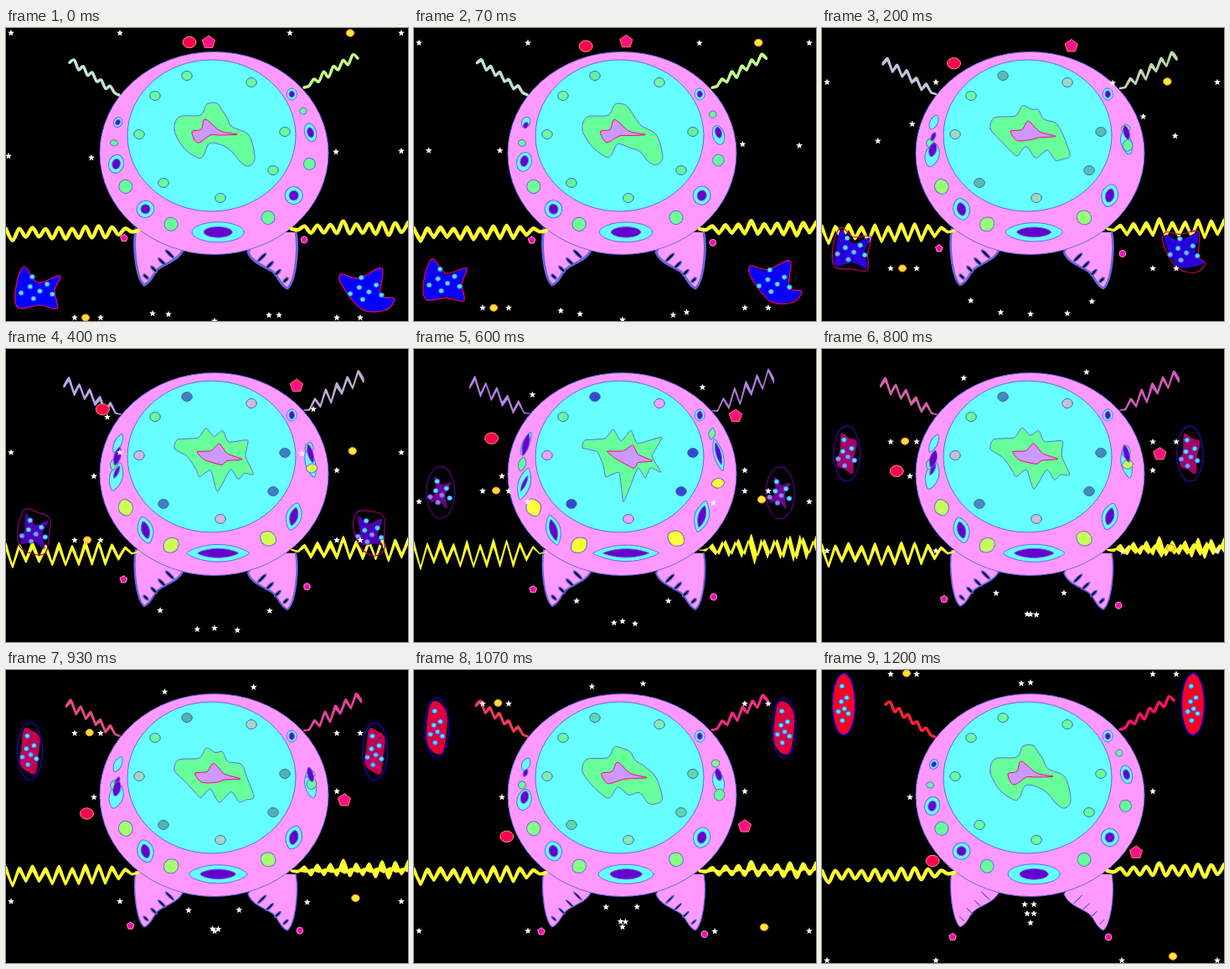
An HTML page with a canvas that plays this animation: 480 by 350 pixels, repeating every 1.27 s.

```html
<!DOCTYPE html>
<html>
<head>
<meta charset="utf-8">
<style>
html, body { margin: 0; width: 100%; height: 100%; overflow: hidden; background: #000; }
canvas { display: block; }
</style>
</head>
<body>
<canvas id="stage" width="480" height="350"></canvas>
<script>
const ctx = document.getElementById('stage').getContext('2d');
const LOOP = 1270, STEP = 200 / 3, TICK = 40, LAST = 29, TAU = Math.PI * 2;
const EDGE = '#6666e0', GREEN = '#66ff99', CYAN = '#66ffff', PINK = '#ff99ff', YELLOW = '#ffff33';

// p runs 0..1 over the loop, m rises to 1 halfway and falls back
let p = 0, m = 0;

const lerp = (a, b, t) => a + (b - a) * t;
const mixPoint = (a, b, t) => [lerp(a[0], b[0], t), lerp(a[1], b[1], t)];
const keyed = (a, b, c, mix) => mix(p < .5 ? a : c, b, m);
const times = (n, make) => Array.from({ length: n }, (_, i) => make(i));
const random = (i, seed) => {
  const v = Math.sin(i * 127.1 + seed * 311.7) * 43758.5;
  return v - Math.floor(v);
};

function mixColor(a, b, t) {
  const part = (c, i) => parseInt(c.slice(i, i + 2), 16);
  return `rgb(${[1, 3, 5].map(i => Math.round(lerp(part(a, i), part(b, i), t)))})`;
}

// Polynomial through points spread evenly over t = 0..1
function along(points, t) {
  const last = points.length - 1, u = t * last;
  let x = 0, y = 0;
  points.forEach(([px, py], i) => {
    let w = 1;
    for (let j = 0; j <= last; j++) if (j !== i) w *= (u - j) / (i - j);
    x += w * px;
    y += w * py;
  });
  return [x, y];
}

function paint(fill, stroke, width = 1, rule = 'nonzero') {
  if (fill) { ctx.fillStyle = fill; ctx.fill(rule); }
  if (stroke) { ctx.strokeStyle = stroke; ctx.lineWidth = width; ctx.stroke(); }
}

function ellipse(x, y, rx, ry, fill, stroke, width, turn = 0) {
  ctx.beginPath();
  ctx.ellipse(x, y, rx, ry, turn, 0, TAU);
  paint(fill, stroke, width);
}

// Curve through the points; k = 0 gives straight sides
function curve(points, k, closed = true) {
  const n = points.length;
  const at = i => closed ? points[(i + n) % n] : points[Math.max(0, Math.min(n - 1, i))];
  ctx.moveTo(...points[0]);
  for (let i = 0; i < (closed ? n : n - 1); i++) {
    const [a, b, c, d] = [at(i - 1), at(i), at(i + 1), at(i + 2)], s = k / 6;
    ctx.bezierCurveTo(b[0] + (c[0] - a[0]) * s, b[1] + (c[1] - a[1]) * s,
      c[0] - (d[0] - b[0]) * s, c[1] - (d[1] - b[1]) * s, ...c);
  }
}

function polygon(x, y, r, sides, fill, stroke, inner = 1) {
  const n = inner < 1 ? sides * 2 : sides;
  ctx.beginPath();
  for (let i = 0; i < n; i++) {
    const a = i / n * TAU - TAU / 4, d = i % 2 && inner < 1 ? r * inner : r;
    ctx.lineTo(x + d * Math.cos(a), y + d * Math.sin(a));
  }
  ctx.closePath();
  paint(fill, stroke);
}

// Ellipse with pointed ends when point nears 1
function leaf([x, y], rx, ry, lean, point, fill) {
  const h = .55 * rx * (1 - point), v = .55 * ry;
  ctx.save();
  ctx.translate(x, y);
  ctx.rotate(lean * TAU / 360);
  ctx.beginPath();
  ctx.moveTo(0, -ry);
  ctx.bezierCurveTo(h, -ry, rx, -v, rx, 0);
  ctx.bezierCurveTo(rx, v, h, ry, 0, ry);
  ctx.bezierCurveTo(-h, ry, -rx, v, -rx, 0);
  ctx.bezierCurveTo(-rx, -v, -h, -ry, 0, -ry);
  paint(fill, EDGE);
  ctx.restore();
}

// A squiggle leaving the body that can split into a zigzag band
function wave(calmLine, spikyLine, count, calmSize, spikeSize, seed) {
  return times(count, i => {
    const t = i / (count - 1), fade = Math.min(1, t * 4), side = i % 2 ? 1 : -1;
    const size = side * fade * (.5 + .5 * random(i, seed));
    const [x, y] = mixPoint(...calmLine, t), [sx, sy] = mixPoint(...spikyLine, t);
    const swing = size * spikeSize, gap = fade * spikeSize * (.12 + .2 * random(i, seed + 9));
    return {
      calm: [x, y + size * calmSize],
      top: [sx, sy + swing - gap],
      bottom: [sx, sy + swing + gap],
      crossed: [sx + 4, sy - swing * 1.2]
    };
  });
}

const leftLine = [[158, 242], [0, 246]], rightLine = [[341, 240], [480, 239]];
const leftWave = wave(leftLine, leftLine, 21, 8, 16, 2);
const rightWave = wave(rightLine, rightLine, 19, 9, 16, 5);
const leftFeeler = wave([[135, 80], [76, 38]], [[138, 77], [66, 39]], 12, 5, 11, 3);
const rightFeeler = wave([[356, 71], [420, 33]], [[356, 74], [430, 31]], 12, 5, 11, 7);

function ribbon(points, color, width, lower = 'bottom') {
  const edge = name => points.map(q => mixPoint(q.calm, q[name], m));
  const k = 1 - m * .75;
  ctx.beginPath();
  curve(edge('top'), k, false);
  if (m) {
    edge(lower).reverse().forEach(q => ctx.lineTo(...q));
    ctx.closePath();
  }
  paint(m && color, color, lerp(width, .6, m), 'evenodd');
}

const blobCalm = [[201, 122], [207, 106], [232, 104], [240, 91], [252, 90], [258, 98], [264, 107], [270, 118],
  [290, 128], [297, 155], [290, 165], [280, 160], [270, 148], [258, 140], [243, 138], [236, 152], [229, 155], [212, 143]];
const blobSpiky = [[201, 118], [204, 109], [228, 107], [238, 96], [247, 111], [259, 97], [267, 113], [297, 105],
  [284, 128], [295, 147], [282, 141], [276, 154], [267, 142], [250, 184], [245, 148], [229, 153], [226, 139], [219, 122]];
const coreCalm = [[222, 124], [233, 121], [238, 109], [256, 123], [276, 127], [255, 128], [244, 128], [229, 137]];
const coreSpiky = [[231, 122], [250, 122], [262, 115], [268, 126], [285, 134], [268, 136], [263, 143], [240, 130]];

function morph(from, to, fill, stroke) {
  ctx.beginPath();
  curve(from.map((q, i) => mixPoint(q, to[i], m)), 1 - m * .6);
  paint(fill, stroke);
}

function rim(degrees) {
  const a = degrees * TAU / 360;
  return [247 + 118 * Math.cos(a), 141 + 103 * Math.sin(a)];
}

// Place on the rim, half width, half height, lean, sideways slip while morphing
const eyes = [[196, 5, 6, 25, 0], [168, 9, 11, 15, -12], [133, 10.5, 10, -15, 0], [87, 12, 31, 90, 0],
  [35, 10.5, 10.5, 15, 0], [-9, 7, 11, -15, 14], [-37, 6, 7, 0, 0]];

function drawRim() {
  const stretch = ([, rx, ry, lean]) => lean ? [lerp(rx, rx * .8, m), ry + 9 * m] : [rx, ry];
  const slip = Math.sin(Math.PI * m), point = m * .9;
  eyes.forEach(e => {
    const [x, y] = rim(e[0]);
    leaf([x, y + e[4] * slip], ...stretch(e), e[3], e[3] && point, CYAN);
  });
  leaf(rim(182), 4.5, lerp(3.5, 9, m), 15, point, GREEN);
  leaf(rim(lerp(12, -24, m)), lerp(7, 4, m), 7, 10, point, GREEN);
  const ripe = mixColor(GREEN, YELLOW, m);
  [152, 115, 56].forEach((a, i) => leaf(rim(a), lerp(8, 9, m), lerp(8, 11, m), 70 * i - 20, m * .5, ripe));
  leaf(rim(lerp(-24, 12, m)), lerp(4, 6, m), lerp(4, 8, m), 80, m * .5, ripe);
  // The two upper left pupils trade places
  eyes.forEach((e, i) => {
    const goal = eyes[i < 2 ? 1 - i : i], [rx, ry] = stretch(e);
    leaf(mixPoint(rim(e[0]), rim(goal[0]), m), rx * .53, ry * lerp(.55, .7, m), e[3], e[3] && point, '#6600cc');
  });
}

function leg() {
  const width = lerp(3, 1, p), open = 1 - p ** 8;
  ctx.beginPath();
  ctx.moveTo(155, 240);
  ctx.bezierCurveTo(151, 262, 156, 300, 165, 307);
  ctx.bezierCurveTo(175, 303, 176, 290, 184, 286);
  ctx.bezierCurveTo(195, 279, 207, 276, 212, 264);
  ctx.lineTo(200, 240);
  paint(PINK, EDGE, width);
  times(4, i => ellipse(167 + 9.5 * i, 297 - 9 * i, .2 + open * 1.6, 4 + i, '#000', EDGE, Math.min(width, 1.5), -.8));
}

function body() {
  leg();
  ctx.save();
  ctx.transform(-1, 0, 0, 1, 501, 4);
  leg();
  ctx.restore();
  ellipse(248.5, 149.5, 136.5, 121, PINK, EDGE);
  ellipse(245.5, 128.5, 100.5, 90.5, CYAN, EDGE);
  const dots = { '#3344cc': [[216, 57], [333, 124], [188, 185], [319, 170]], [PINK]: [[293, 65], [159, 127], [256, 203]], [GREEN]: [[178, 81]] };
  for (const [color, places] of Object.entries(dots))
    places.forEach(q => ellipse(...q, 6.3, 5.5, mixColor(GREEN, color, m), '#4466cc'));
  morph(blobCalm, blobSpiky, GREEN, EDGE);
  morph(coreCalm, coreSpiky, '#cc99ff', '#ff0066');
  drawRim();
}

// Outlines are relative to the centre of each creature
const critters = [
  { from: [38, 311], to: [26, 41],
    calm: [[-16, -26], [0, -7], [26, -15], [20, 3], [23, 24], [2, 20], [-24, 23], [-26, -3]] },
  { from: [431, 312], to: [443, 41],
    calm: [[-31, -18], [-10, -13], [18, -25], [16, 7], [33, 11], [22, 25], [-6, 24], [-30, -5]] }];

function critter({ from, to, calm }) {
  const ring = (rx, ry, dent = 1) => calm.map((_, i) => {
    const a = i / calm.length * TAU - 2.1, d = i % 2 ? dent : 1;
    return [rx * d * Math.cos(a), ry * d * Math.sin(a)];
  });
  const end = ring(13.5, 37);
  const shape = middle => {
    ctx.beginPath();
    curve(calm.map((q, i) => keyed(q, middle[i], end[i], mixPoint)), 1);
  };
  ctx.save();
  ctx.translate(...mixPoint(from, to, p));
  shape(ring(14, 22, .4));
  paint(keyed('#0000ff', '#700090', '#ff0022', mixColor));
  shape(ring(17, 31));
  paint(null, keyed('#ff0066', '#600080', '#0000ff', mixColor), 1.2);
  const spread = keyed([22, 19], [14, 18], [7, 30], mixPoint);
  times(7, i => {
    const a = i * 2.4 + 1, d = Math.sqrt((i + .3) / 7);
    ellipse(spread[0] * d * Math.cos(a), spread[1] * d * Math.sin(a), 3, 2.8,
      mixColor('#66e0ff', i % 3 ? '#66e0ff' : '#cc66cc', m), '#2266ff');
  });
  ctx.restore();
}

const drifters = [
  [[339, 6], [357, 178], [358, 347]], [[102, 155], [139, 57], [238, 16]], [[394, 148], [347, 48], [249, 15]],
  [[175, 341], [193, 302], [242, 280]], [[326, 343], [305, 302], [253, 280]],
  [[194, 342], [238, 328], [245, 291]], [[314, 343], [265, 329], [253, 291]], [[249, 350], [249, 302]]];
// These two settle after a third of the loop
const settling = [[[3, 153], [65, 135], [105, 152]], [[472, 147], [423, 129], [395, 145]]];

function sky() {
  const star = (x, y) => polygon(x, y, 4.2, 5, '#fff', null, .42);
  [6, 136, 472].forEach(x => star(x, lerp(6, 347, p)));
  [82, 113, 395, 423].forEach(x => star(x, lerp(346, 5, p)));
  drifters.forEach(path => star(...along(path, p)));
  settling.forEach(path => star(...along(path, Math.min(1, p * 3))));
  ellipse(...along([[95, 346], [101, 4]], p), 4.5, 4, '#ffdd33', '#ff9933');
  ellipse(...along([[411, 6], [419, 342]], p), 4.8, 4.3, '#ffee33', '#ff7733');
  ellipse(...along([[219, 17], [94, 103], [132, 228]], p), 8, 6.7, '#ff0055', '#ff9955');
  polygon(...along([[242, 17], [344, 42], [402, 119], [375, 218]], p), 8, 5, '#ff1188', '#ff7755');
  polygon(...along([[141, 251], [142, 286], [156, 319]], p), 4.5, 5, '#ee11aa', '#ff99bb');
  ellipse(...along([[356, 253], [358, 295], [342, 319]], p), 3.8, 4, '#ee11bb', '#ff99bb');
}

function draw(now) {
  const step = Math.floor((now % LOOP + 3.4) / STEP);
  p = Math.min(LAST, Math.floor(step * STEP / TICK + .01)) / LAST;
  m = 1 - Math.abs(2 * p - 1);
  ctx.lineJoin = ctx.lineCap = 'round';
  ctx.fillStyle = '#000';
  ctx.fillRect(0, 0, 480, 350);
  body();
  ribbon(leftFeeler, keyed('#c0e8d0', '#b888f0', '#ff2233', mixColor), 3.5);
  ribbon(rightFeeler, keyed('#c4ff88', '#b888f0', '#ff1166', mixColor), 3.5);
  ribbon(leftWave, YELLOW, 4.5);
  ribbon(rightWave, YELLOW, 4.5, p < .5 ? 'bottom' : 'crossed');
  critters.forEach(critter);
  sky();
  requestAnimationFrame(() => draw(performance.now() - start));
}

const start = performance.now();
draw(0);
</script>
</body>
</html>
```
